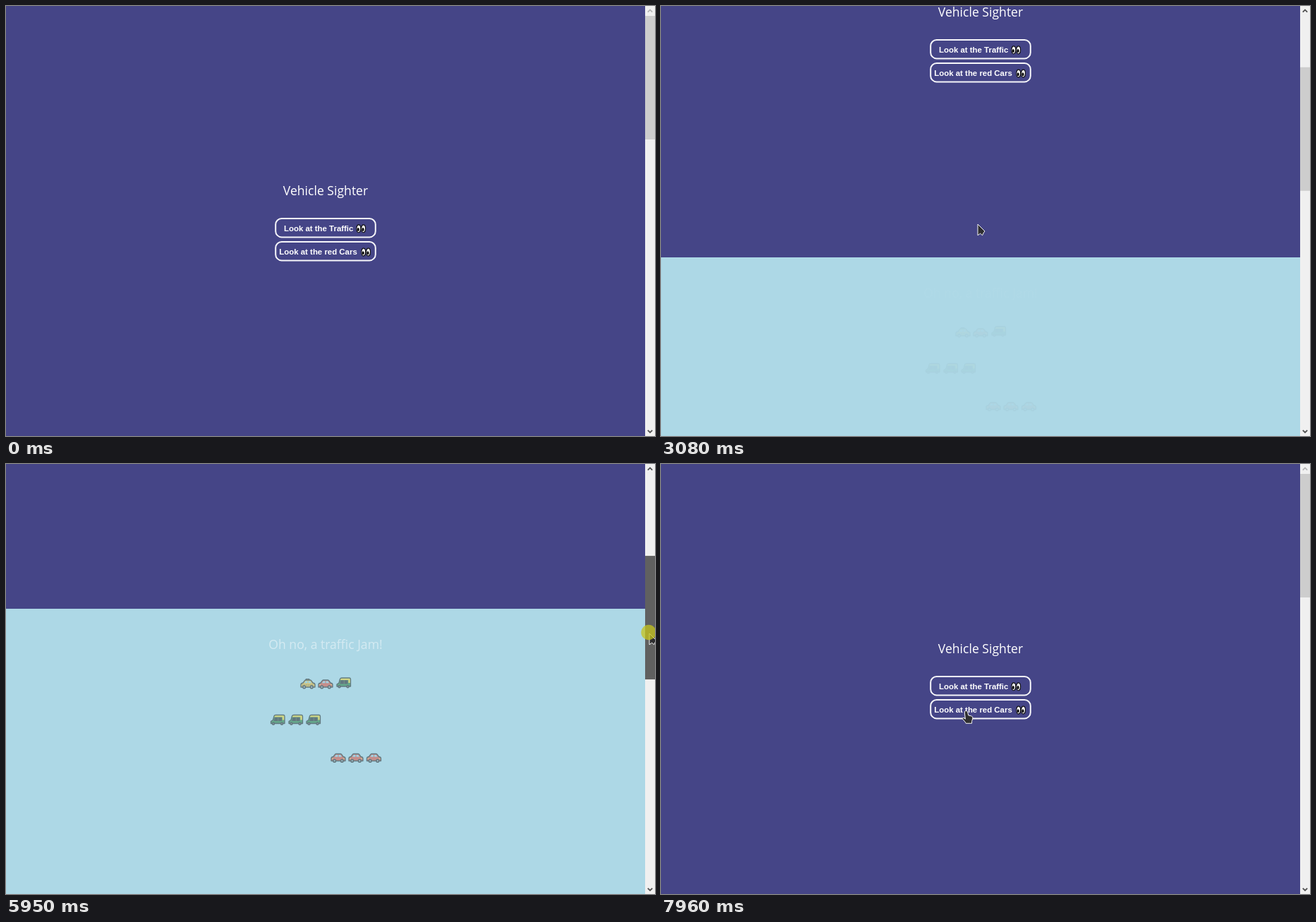
These frames come from a looping animation (920 px wide and 609 px high, 8 s). An HTML page:

```html
<!DOCTYPE html>
<html lang="en">
<head>
<meta charset="utf-8">
<title>Vehicle Sighter</title>
<style>
  html, body { margin: 0; width: 100%; height: 100%; overflow: hidden; background: #add8e6; }
  svg { display: block; width: 920px; height: 609px; }
  .head { font: 17.6px "Open Sans", "Noto Sans", sans-serif; fill: #fff; text-anchor: middle; }
  .label { font: bold 11.43px "Liberation Sans", Arial, sans-serif; fill: #fff; }
  .button { fill: none; stroke: #f6f6fa; stroke-width: 2; }
  .chevron { fill: none; stroke: #505050; stroke-width: 1.8; }
  .pointer { fill: #2e2e30; stroke: #f4f4f4; stroke-width: 1; stroke-linejoin: round; }
</style>
</head>
<body>
<svg viewBox="0 0 920 609">
  <defs>
    <g id="eye">
      <ellipse rx="2.9" ry="5.4" fill="#fff" stroke="#111" stroke-width="1.1"/>
      <ellipse cx="-.6" cy="1.2" rx="1.6" ry="2.5" fill="#111"/>
    </g>
    <g id="eyes"><use href="#eye" x="-3.4"/><use href="#eye" x="3.4"/></g>

    <g id="wheels" fill="#a9b0b5" stroke="#111" stroke-width="1.5">
      <circle cx="5.7" cy="11.4" r="1.8"/><circle cx="16.3" cy="11.4" r="1.8"/>
    </g>
    <path id="body" stroke="#111" stroke-width="1.3" stroke-linejoin="round"
      d="M1 8Q1 6 4 5.5L6.5 2.2Q7 1.5 8 1.5H14Q15 1.5 15.6 2.2L18 5.5Q21 6 21 8V11.5H1Z"/>
    <path id="glass" fill="#8ccfe6" d="M6 5.7L7.8 2.9H10.4V5.7ZM11.6 2.9H14.2L16 5.7H11.6Z"/>
    <g id="car">
      <use href="#body" fill="#e0402a"/><use href="#glass"/><use href="#wheels"/>
      <path d="M2 8H4M18 8H20" stroke="#ffc83d" stroke-width="1.2"/>
    </g>
    <g id="taxi">
      <path d="M8 1.5V0H13V1.5" fill="#ffd84a" stroke="#111"/>
      <use href="#body" fill="#f3b41f"/><use href="#glass"/><use href="#wheels"/>
      <path d="M3 8.6H19" stroke="#222" stroke-width="1" stroke-dasharray="1.3 1.3"/>
    </g>
    <g id="rickshaw" stroke="#111" stroke-linejoin="round">
      <path d="M1 13V10L4 8L5.5 2.5Q6 1 8 1H19Q20.5 1 20.5 3V13Z" fill="#17752a" stroke-width="1.3"/>
      <path d="M6 3Q6.5 1.7 8 1.7H18.5Q19.8 1.7 19.8 3V8H17.3V4H6Z" fill="#ffd51f" stroke="none"/>
      <path d="M6.5 4.2H16.5V9.5H5.3Z" fill="#111" stroke="none"/>
      <path d="M11.3 4V10" stroke="#3b5a2c" stroke-width=".8"/>
      <g fill="#777" stroke-width="1.5"><circle cx="4.5" cy="13.2" r="1.5"/><circle cx="16.5" cy="13.2" r="1.5"/></g>
    </g>
  </defs>

  <rect width="920" height="609" fill="#add8e6"/>
  <g id="page">
    <rect width="907" height="609" fill="#454587"/>
    <text class="head" x="453" y="268">Vehicle Sighter</text>
    <rect class="button" x="382.2" y="301" width="141.6" height="26.4" rx="8.5"/>
    <text class="label" x="394" y="319">Look at the Traffic</text>
    <use href="#eyes" x="503.3" y="315.3"/>
    <rect class="button" x="382.2" y="334" width="141.6" height="26.4" rx="8.5"/>
    <text class="label" x="387.3" y="352">Look at the red Cars</text>
    <use href="#eyes" x="510.2" y="348.5"/>

    <g id="jam" transform="translate(0 609)">
      <text class="head" x="453" y="57">Oh no, a traffic Jam!</text>
      <use href="#taxi" x="417" y="99.5"/><use href="#car" x="442" y="99.5"/><use href="#rickshaw" x="468" y="97"/>
      <use href="#rickshaw" x="374.5" y="149.5"/><use href="#rickshaw" x="400" y="149.5"/><use href="#rickshaw" x="425" y="149.5"/>
      <use href="#car" x="460" y="204"/><use href="#car" x="485" y="204"/><use href="#car" x="510.5" y="204"/>
    </g>
  </g>

  <rect x="906" width="14" height="609" fill="#f0f0f0"/>
  <rect id="thumb" x="906" width="14" height="175"/>
  <path id="up" class="chevron" d="M909.8 8.6L913 5.4L916.2 8.6"/>
  <path class="chevron" d="M909.8 600.8L913 604L916.2 600.8"/>

  <g id="cursor">
    <path id="arrow" class="pointer" d="M0 0V15.8L3.6 13.2L6.6 15.8L8.4 12L10 10Z"/>
    <path id="hand" class="pointer" d="M0-.5C1.5-.8 2.4.4 2.8 2L3.8 6L8.4 7Q10.3 8 9.8 10.5L8.6 14.5V17.3H.2L-.8 15.4L-4.8 10.8Q-4.4 8.8-2.4 9.8L-.6 11.2L-1.7 2Q-1.8-.2 0-.5Z"/>
    <circle id="press" cx="-1" cy="-1.5" r="10.7" fill="#c6c41c" opacity=".75"/>
  </g>
</svg>
<script>
const LOOP = 8000, TICK = 66.8, VIEW = 609, THUMB = 175;
const $ = id => document.getElementById(id);
const linear = p => p;
const smooth = p => p * p * (3 - 2 * p);
const clamp = p => Math.min(1, Math.max(0, p));

// Keys are [time, values, easing into this key].
const scrollKeys = [
  [2870, [0]], [3350, [609], smooth],
  [5690, [609]], [6222, [198]], [6550, [35]], [6680, [0]]
];
const cursorKeys = [
  [270, [798, 596]], [1010, [375, 337], smooth],
  [1020, [375, 337]], [1410, [441, 310], smooth],
  [1550, [441, 310]], [1680, [449, 309]],
  [4410, [449, 309]], [5010, [904, 304], smooth],
  [5090, [904, 304]], [5280, [912, 302]],
  [5690, [912, 302]], [6222, [912, 178]], [6550, [912, 133]], [6830, [912, 113]],
  [7060, [912, 112]], [7160, [880, 115]], [7250, [800, 124]], [7350, [682, 138]],
  [7430, [597, 160]], [7630, [520, 212]], [7800, [470, 268]], [7960, [432, 350]]
];

function at(keys, t) {
  const next = keys.findIndex(key => key[0] > t);
  if (next === 0) return keys[0][1];
  if (next < 0) return keys[keys.length - 1][1];
  const [t0, from] = keys[next - 1], [t1, to, ease = linear] = keys[next];
  const p = ease((t - t0) / (t1 - t0));
  return from.map((v, i) => v + (to[i] - v) * p);
}

const between = (v, low, high) => v >= low && v < high;
const show = (id, on) => $(id).setAttribute("visibility", on ? "visible" : "hidden");

function draw(time) {
  const t = Math.floor(time / TICK) * TICK + 10;
  const scroll = Math.round(at(scrollKeys, t)[0]);
  const [x, y] = at(cursorKeys, t).map(Math.round);
  const visible = t >= 270;
  const dragging = between(t, 5550, 7060);
  const thumbY = 14 + scroll * THUMB / VIEW;
  const overThumb = visible && x >= 906 && between(y, thumbY, thumbY + THUMB);
  const overButton = between(x, 381, 525) &&
    (between(y + scroll, 300, 329) || between(y + scroll, 333, 362));

  $("page").setAttribute("transform", `translate(0 ${-scroll})`);
  // The jam appears as its section fills the view.
  $("jam").setAttribute("opacity", clamp((scroll / VIEW - 0.4) / 0.55));
  $("thumb").setAttribute("y", thumbY);
  $("thumb").setAttribute("fill", dragging ? "#606060" : overThumb ? "#a8a8a8" : "#cdcdcd");
  $("up").style.stroke = scroll ? "#505050" : "#b4b4b4";
  $("cursor").setAttribute("transform", `translate(${x} ${y})`);
  show("press", dragging || between(t, 2680, 2880));
  show("hand", visible && overButton);
  show("arrow", visible && !overButton);
}

const start = performance.now();
function frame() {
  draw((performance.now() - start) % LOOP);
  requestAnimationFrame(frame);
}
frame();
</script>
</body>
</html>
```
